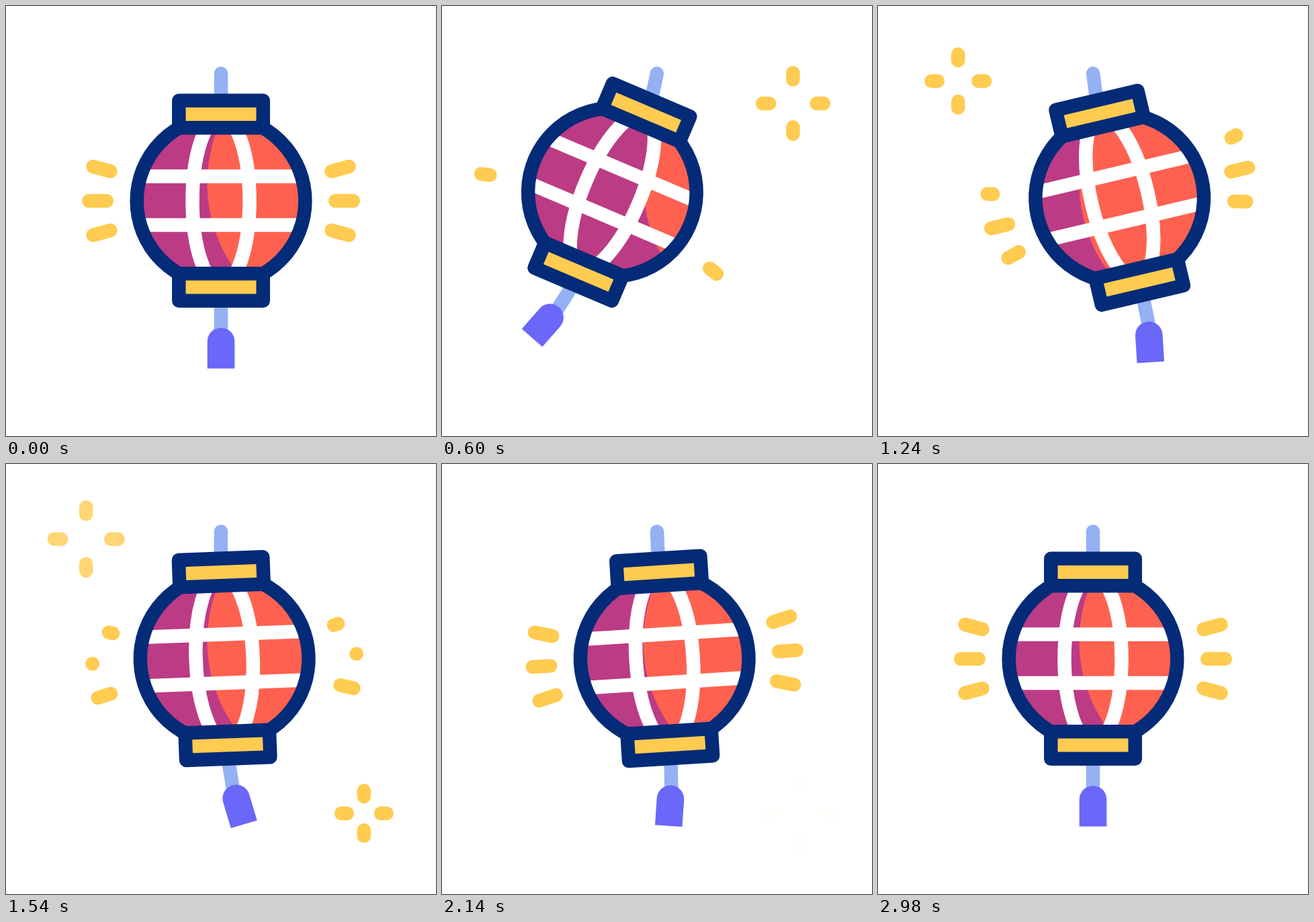
These frames come from a looping animation (640 px wide and 640 px high, 3.6 s). An HTML page with a canvas:

```html
<!DOCTYPE html>
<html lang="en">
<head>
<meta charset="utf-8">
<title>Swinging lantern</title>
<style>
  html, body { margin: 0; width: 100%; height: 100%; overflow: hidden; background: #fff; }
  canvas { display: block; }
</style>
</head>
<body>
<canvas id="stage" width="640" height="640"></canvas>
<script>
const ctx = document.getElementById('stage').getContext('2d');
const LOOP = 3600, STEP = 20, LINE = 20.5;
const NAVY = '#042b77', YELLOW = '#ffcb50', CORAL = '#ff6150', PLUM = '#bc3b85',
      SKY = '#94b1f4', VIOLET = '#6a67f9';

const clamp = u => Math.max(0, Math.min(1, u));
const smooth = u => (u = clamp(u), u * u * (3 - 2 * u));

// Damped swing shared by all joints: [time, degrees]
const SWING = [[0, 0], [780, 13.5], [1250, -7.7], [1730, 5], [2200, -3], [2440, 1], [2680, 0]];

// Joints further down the chain follow with a growing delay.
function swing(t, lag) {
  const at = i => i ? Math.min(2980, SWING[i][0] + lag * (0.9 + i * 0.1)) : 0;
  for (let i = 1; i < SWING.length; i++) {
    if (t >= at(i)) continue;
    let u = (t - at(i - 1)) / (at(i) - at(i - 1));
    if (i === 1) u **= 0.9;
    const from = SWING[i - 1][1], to = SWING[i][1];
    return from + (to - from) * smooth(u);
  }
  return 0;
}

function turn(y, degrees) {
  ctx.translate(320, y);
  ctx.rotate(degrees * Math.PI / 180);
  ctx.translate(-320, -y);
}

function line(x1, y1, x2, y2, color, cap = 'round') {
  ctx.lineCap = cap;
  ctx.strokeStyle = color;
  ctx.beginPath();
  ctx.moveTo(x1, y1);
  ctx.lineTo(x2, y2);
  ctx.stroke();
}

function oval(rx, ry) {
  ctx.beginPath();
  ctx.ellipse(320, 290, rx, ry, 0, 0, Math.PI * 2);
}

function band(y) {
  ctx.fillStyle = YELLOW;
  ctx.strokeStyle = NAVY;
  ctx.beginPath();
  ctx.rect(257.3, y, 125.4, 40.5);
  ctx.fill();
  ctx.stroke();
}

function lantern() {
  ctx.save();
  oval(125.3, 125.3);
  ctx.clip();
  ctx.fillStyle = PLUM;
  ctx.fillRect(180, 150, 280, 280);

  // The lit side stays put while the lantern swings through it.
  ctx.save();
  ctx.resetTransform();
  ctx.fillStyle = CORAL;
  ctx.beginPath();
  ctx.arc(520.5, 264, 221, 0, Math.PI * 2);
  ctx.fill();
  ctx.restore();

  for (const y of [253.5, 326]) line(190, y, 450, y, '#fff', 'butt');
  oval(42.5, 125.3);
  ctx.stroke();
  ctx.restore();

  ctx.strokeStyle = NAVY;
  oval(125.3, 125.3);
  ctx.stroke();
  band(140.7);
  band(398.3);
}

// Rays are wiped out and redrawn from the lantern outwards, top to bottom.
const RAYS = [[155.5, 246, 129.5, 239], [149.8, 290, 123.2, 290], [155.5, 334, 129.5, 341]];

function rays(t) {
  RAYS.forEach(([x1, y1, x2, y2], i) => {
    const phase = start => smooth((t - start - i * 200) / 333);
    let a = phase(33), b = 1;
    for (const [draw, wipe] of [[633, 1033], [1433, Infinity]]) {
      if (t >= draw + i * 200) {
        a = phase(wipe);
        b = phase(draw);
      }
    }
    if (b <= a) return;
    const x = u => x1 + (x2 - x1) * u, y = u => y1 + (y2 - y1) * u;
    line(x(a), y(a), x(b), y(b), YELLOW);
    line(640 - x(a), y(a), 640 - x(b), y(b), YELLOW);
  });
}

function sparkle(x, y, age) {
  const life = 750, fade = 100;
  if (age < 0 || age >= life) return;
  const u = age / life, inner = 22 + 16.5 * u, outer = 30.2 + 19 * u;
  ctx.globalAlpha = smooth((age + 5) / fade) * smooth((life - age) / fade);
  for (const [dx, dy] of [[1, 0], [0, 1], [-1, 0], [0, -1]]) {
    line(x + dx * inner, y + dy * inner, x + dx * outer, y + dy * outer, YELLOW);
  }
  ctx.globalAlpha = 1;
}

function tassel() {
  ctx.fillStyle = VIOLET;
  ctx.beginPath();
  ctx.arc(320, 499.2, 20.3, Math.PI, 0);
  ctx.lineTo(340.3, 539.5);
  ctx.lineTo(299.7, 539.5);
  ctx.fill();
}

function render(t) {
  ctx.resetTransform();
  ctx.fillStyle = '#fff';
  ctx.fillRect(0, 0, 640, 640);
  ctx.lineWidth = LINE;
  ctx.lineJoin = 'round';

  sparkle(522.4, 145, t);
  sparkle(119.2, 111.7, t - 860);
  sparkle(532.8, 520, t - 1400);

  turn(100, swing(t, 0));
  line(320, 100.5, 320, 142, SKY);
  turn(141.5, swing(t, 75));

  ctx.save();
  turn(440, swing(t, 200));
  line(320, 436, 320, 490, SKY, 'butt');
  turn(480, swing(t, 290));
  tassel();
  ctx.restore();

  lantern();
  rays(t);
}

const begin = performance.now();
function tick() {
  const t = (performance.now() - begin) % LOOP;
  render(Math.floor(t / STEP) * STEP);
  requestAnimationFrame(tick);
}
tick();
</script>
</body>
</html>
```
